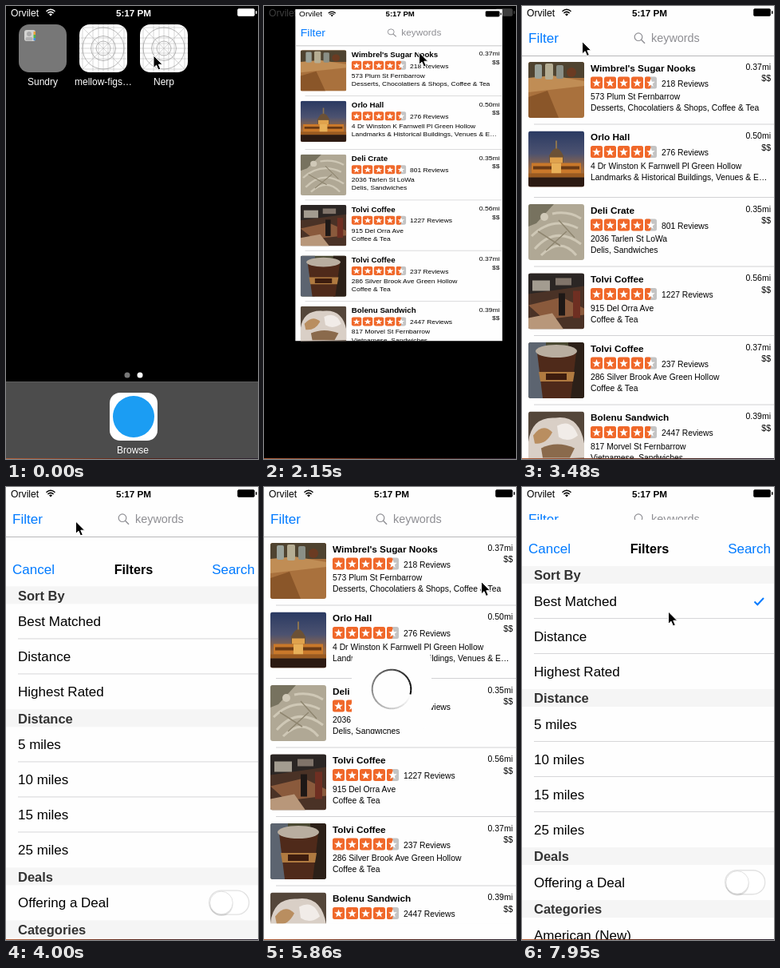
Animation of 316x567 px, one loop 8 s. Source, as an HTML page:

```html
<!DOCTYPE html>
<html lang="en">
<head>
<meta charset="utf-8">
<title>Phone demo</title>
<style>
  html, body { margin: 0; height: 100%; overflow: hidden; background: #000; }
  svg { display: block; width: 100vw; height: 100vh; font-family: "Liberation Sans", Arial, sans-serif; }
  .b { font-weight: bold; }
  .end { text-anchor: end; }
  .mid { text-anchor: middle; }
</style>
</head>
<body>
<svg id="stage" viewBox="0 0 316 567" xmlns="http://www.w3.org/2000/svg"></svg>
<script>
const W = 316, H = 567, BLUE = '#007aff';

// ---- drawing helpers (all return SVG markup) ----
const text = (x, y, size, str, fill = '#000', cls = '') =>
  `<text x="${x}" y="${y}" font-size="${size}" fill="${fill}" class="${cls}">${str.replace(/&/g, '&amp;')}</text>`;
const rect = (x, y, w, h, fill, r = 0) =>
  `<rect x="${x}" y="${y}" width="${w}" height="${h}" rx="${r}" fill="${fill}"/>`;
const circle = (x, y, r, fill, more = '') =>
  `<circle cx="${x}" cy="${y}" r="${r}" fill="${fill}" ${more}/>`;
const path = (d, fill, more = '') => `<path d="${d}" fill="${fill}" ${more}/>`;
const line = (d, color, width = 1) => path(d, 'none', `stroke="${color}" stroke-width="${width}"`);
const group = (x, y, body, id = '') => `<g id="${id}" transform="translate(${x} ${y})">${body}</g>`;
const map = (list, fn) => list.map(fn).join('');

function statusBar(color) {
  return text(6, 12.5, 12.2, 'Orvilet', color) +
    line('M50.5 6.8Q56 1.8 61.5 6.8M52.4 9Q56 5.8 59.6 9', color, 1.5) +
    path('M54 10.4Q56 8.6 58 10.4L56 12.6Z', color) +
    text(160, 12.5, 11.7, '5:17 PM', color, 'b mid') +
    `<rect x="290.5" y="3.5" width="21" height="9" rx="1.5" fill="${color}" stroke="${color}" stroke-opacity=".6"/>` +
    rect(313, 6, 1.5, 4, color, .7);
}

// ---- home screen ----
function blankIcon(x) {
  const grid = map([4, 17, 24, 30, 36, 43, 56], p => `M${p} 0V60M0 ${p}H60`);
  return group(x, 23, rect(0, 0, 60, 60, '#fff', 13) +
    `<g clip-path="url(#tile)">` + line(grid + 'M0 0L60 60M60 0L0 60', '#bdbdbd', .6) +
    map([9, 15.5, 26], r => circle(30, 30, r, 'none', 'stroke="#999" stroke-width=".7"')) + '</g>');
}

function homeScreen() {
  const label = (x, y, s) => text(x, y, 12, s, '#fff', 'mid');
  return rect(16, 23, 60, 60, '#777', 13) +
    rect(23, 30, 14, 14, '#d4d4d2', 3) + circle(29, 35, 3, '#aaa') + rect(24.5, 39, 9, 4.5, '#b2b2b2', 2) +
    rect(34.5, 32, 2.5, 4, '#e8a33c') + rect(34.5, 36, 2.5, 4, '#4fb848') + rect(34.5, 40, 2.5, 3, '#3c8fe0') +
    blankIcon(92) + blankIcon(168) +
    label(46, 99, 'Sundry') + label(122, 99, 'mellow-figs…') + label(198, 99, 'Nerp') +
    circle(152, 462, 3.5, '#777') + circle(168, 462, 3.5, '#fff') +
    rect(0, 470, W, 97, '#4c4c4c') + rect(0, 470, W, 1, '#5c5c5c') +
    rect(130, 484, 60, 60, '#fff', 13) + circle(160, 514, 26, '#1b9df3') + label(159, 560, 'Browse');
}

// ---- business list ----
const photos = [
  rect(0, 0, 70, 70, '#a9713d') + rect(0, 0, 70, 20, '#4f4330') + path('M0 20L30 17L70 24V30L0 38Z', '#c08d55') +
    rect(8, 3, 9, 18, '#9aa29a', 2) + rect(21, 2, 10, 20, '#b5ad93', 2) + rect(35, 4, 9, 17, '#8a8f86', 2) +
    path('M0 44L24 36L38 70H0Z', '#8a5629') + circle(54, 13, 6, '#6b3b22'),
  rect(0, 0, 70, 70, 'url(#dusk)') +
    path('M26 40V31Q35 12 44 31V40Z', '#6b5136') + rect(34, 12, 2, 10, '#8a7350') + rect(27, 33, 16, 7, '#e0a24c') +
    rect(4, 40, 62, 13, '#c9782a') + line('M6 46H64', '#6a3a14', 4) + rect(29, 40, 12, 13, '#e8b058') +
    rect(0, 53, 70, 5, '#9a5a20') + rect(0, 58, 70, 12, '#2c1a12'),
  rect(0, 0, 70, 70, '#b0a895') + path('M0 0H32L10 24L0 28Z', '#77725f') +
    line('M4 40Q30 14 62 30M8 56Q34 26 66 50M16 64Q40 40 60 64M30 12Q50 8 66 18', '#cfc8b6', 3) +
    line('M12 34L40 52M38 20L58 42M22 58L48 34', '#8f8670', 1.5) + circle(20, 16, 5, '#d0c9b8'),
  rect(0, 0, 70, 70, '#4a3226') + path('M0 0H70V16L0 26Z', '#2b2624') + rect(5, 9, 22, 13, '#a39c90') +
    rect(34, 6, 20, 9, '#80746a') + path('M0 40L42 30L70 44V52L20 58Z', '#8a5a3c') +
    rect(38, 25, 8, 28, '#1e1816') + rect(56, 22, 9, 34, '#6f2f22') + path('M0 56L30 50L44 70H0Z', '#b8977a'),
  rect(0, 0, 70, 70, '#4b4a33') + rect(0, 0, 22, 70, '#5c6470') + rect(50, 0, 20, 70, '#2c2018') +
    path('M11 13H60L53 70H18Z', '#4f2a1a') + `<ellipse cx="35" cy="11" rx="26" ry="8" fill="#b9aea0"/>` +
    path('M13 37H58L56 49H15Z', '#b07a40') + path('M22 39H48V47H22Z', '#3d1c0e'),
  rect(0, 0, 70, 70, '#54463a') + path('M0 38Q4 6 34 8Q64 4 70 40V58L0 60Z', '#d9cfc6') +
    path('M6 30Q18 14 30 26Q22 42 8 40Z', '#b98e60') + path('M36 18Q54 8 62 30Q50 40 38 32Z', '#f1ece8') +
    path('M16 46Q36 36 58 46L52 58H18Z', '#8a6a4c')
];

const rows = [
  [70, "Wimbrel's Sugar Nooks", 218, '0.37', '573 Plum St Fernbarrow', 'Desserts, Chocolatiers & Shops, Coffee & Tea'],
  [156.5, 'Orlo Hall', 276, '0.50', '4 Dr Winston K Farnwell Pl Green Hollow', 'Landmarks & Historical Buildings, Venues & E…'],
  [248, 'Deli Crate', 801, '0.35', '2036 Tarlen St LoWa', 'Delis, Sandwiches'],
  [334.5, 'Tolvi Coffee', 1227, '0.56', '915 Del Orra Ave', 'Coffee & Tea'],
  [421, 'Tolvi Coffee', 237, '0.37', '286 Silver Brook Ave Green Hollow', 'Coffee & Tea'],
  [507.5, 'Bolenu Sandwich', 2447, '0.39', '817 Morvel St Fernbarrow', 'Vietnamese, Sandwiches']
];

const starPath = 'M' + Array.from({ length: 10 }, (_, i) => {
  const r = i % 2 ? 2.3 : 5.6, a = i * Math.PI / 5;
  return (7.5 + r * Math.sin(a)).toFixed(2) + ' ' + (8 - r * Math.cos(a)).toFixed(2);
}).join('L') + 'Z';

const stars = map([0, 1, 2, 3, 4], i => group(86 + 17 * i, 18.5,
  rect(0, 0, 15, 15, i < 4 ? '#f0682a' : '#c4c4c4', 2.5) +
  (i < 4 ? '' : rect(0, 0, 7.5, 15, '#f0682a', 2)) + path(starPath, '#fff')));

function businessRow([y, name, reviews, miles, address, kinds], i) {
  return group(0, y,
    (i ? line('M15 -8.5H316', '#d2d2d4') : '') +
    `<g transform="translate(8 0)" clip-path="url(#thumb)">${photos[i]}</g>` + stars +
    text(86, 11.5, 11.8, name, '#000', 'b') + text(175, 30.5, 10.3, reviews + ' Reviews') +
    text(86, 47, 10.35, address) + text(86, 61, 10.35, kinds) +
    text(312, 9.5, 10.5, miles + 'mi', '#000', 'end') + text(312, 24, 10.5, '$$', '#000', 'end'));
}

const listScreen = () => rect(0, 0, W, H, '#fefefe') + map(rows, businessRow) +
  line('M0 62.5H316', '#b8b8ba') +
  `<g id="filter">${text(8, 46.3, 17.1, 'Filter', BLUE)}</g>` +
  circle(146, 38.7, 4.8, 'none', 'stroke="#8e8e93" stroke-width="1.2"') +
  line('M149.5 42.3L154 46.8', '#8e8e93', 1.4) + text(162, 45, 14.4, 'keywords', '#8e8e93');

// ---- filter sheet ----
function filterSheet() {
  const header = (y, s) => rect(0, y, W, 22, '#f5f5f5') + text(15, y + 17.5, 16.5, s, '#333', 'b');
  const items = (y, list) => map(list, (s, i) =>
    text(15, y + 44 * i + 28, 17, s) + (i ? line(`M15 ${y + 44 * i - .5}H316`, '#d6d6d8') : ''));
  return rect(0, 0, W, H, '#fefefe') +
    text(8, 42.2, 17, 'Cancel', BLUE) + text(160, 42.2, 16.2, 'Filters', '#000', 'b mid') +
    text(312, 42.2, 17, 'Search', BLUE, 'end') +
    `<g id="press">${rect(0, 80, W, 44, '#d9d9d9')}</g>` +
    header(58, 'Sort By') + items(80, ['Best Matched', 'Distance', 'Highest Rated']) +
    header(212, 'Distance') + items(234, ['5 miles', '10 miles', '15 miles', '25 miles']) +
    header(410, 'Deals') + items(432, ['Offering a Deal']) +
    `<rect x="254.7" y="438.7" width="50" height="30" rx="15" fill="#fff" stroke="#e2e2e2" stroke-width="1.4"/>` +
    circle(270, 456, 14.5, '#000', 'opacity=".12"') +
    circle(270, 454, 14.3, '#fff', 'stroke="#d5d5d5" stroke-width=".7"') +
    header(476, 'Categories') + items(498, ['American (New)', 'American (Traditional)']) +
    `<g id="check">${line('M291.5 102.5L295.3 106.3L303 98', BLUE, 2)}</g>`;
}

const spinner = Array.from({ length: 60 }, (_, i) => circle(0, 0, 24.3, 'none',
  `pathLength="60" stroke="#000" stroke-width="2" stroke-opacity="${(i / 59).toFixed(2)}"
   stroke-dasharray="1.05 58.95" stroke-dashoffset="${-i}"`)).join('');

const $ = id => document.getElementById(id);
$('stage').innerHTML =
  `<defs>
    <clipPath id="tile"><rect width="60" height="60" rx="13"/></clipPath>
    <clipPath id="thumb"><rect width="70" height="70" rx="3"/></clipPath>
    <clipPath id="screen"><rect width="${W}" height="${H}"/></clipPath>
    <linearGradient id="edge"><stop stop-color="#b0603c"/><stop offset=".5" stop-color="#5a2418"/><stop offset="1" stop-color="#2a2230"/></linearGradient>
    <linearGradient id="dusk" x2="0" y2="1"><stop stop-color="#2a3a62"/><stop offset=".4" stop-color="#4c5270"/><stop offset=".7" stop-color="#a06a3c"/></linearGradient>
  </defs>` + rect(0, 0, W, H, '#000') +
  `<g id="home">${homeScreen()}</g><g id="homeBar">${statusBar('#fff')}</g>
  <g id="app" clip-path="url(#screen)">${listScreen()}<g id="sheet">${filterSheet()}</g>${statusBar('#000')}</g>
  <g id="hud">${rect(110, 204, 100, 99, '#fefefe', 14)}${group(160, 253, `<g id="spin">${spinner}</g>`)}</g>` +
  rect(0, 566, W, 1, 'url(#edge)') +
  group(0, 0, path('M0 0V15.5L3.5 12.2L6 18L8.8 16.8L6.3 11.2H11.2Z', '#000', 'stroke="#fff" stroke-width="1"'), 'cursor');

// ---- motion ----
const clamp = v => Math.max(0, Math.min(1, v));
const ramp = (t, a, b) => clamp((t - a) / (b - a));
const show = (id, opacity) => $(id).setAttribute('opacity', opacity);
const place = (id, transform) => $(id).setAttribute('transform', transform);

// critically damped spring falling from 1 to 0
function spring(t, start) {
  const x = Math.max(0, t - start) * .0195;
  return (1 + x) * Math.exp(-x);
}

// pointer stops: time, x, y
const stops = [
  [1170, 185, 62], [1530, 194.5, 58], [3120, 194.5, 58], [3640, 36, 40], [3740, 36, 40], [3997, 87.5, 43],
  [4520, 122, 108], [4790, 122, 108], [5400, 276, 36], [5580, 276, 36], [5841, 272.5, 118.5],
  [6360, 195, 243], [6910, 195, 243], [7590, 36, 40], [7690, 36, 40], [7948, 183.5, 156]
];

function pointer(t) {
  const i = stops.findIndex(s => s[0] > t);
  if (i === 0) return stops[0].slice(1);
  if (i < 0) return stops[stops.length - 1].slice(1);
  const [a, b] = [stops[i - 1], stops[i]];
  const u = ramp(t, a[0], b[0]), e = u * u * (3 - 2 * u);
  return [1, 2].map(k => a[k] + (b[k] - a[k]) * e);
}

function draw(t) {
  // the app grows out of its icon, each edge at its own pace
  const u = ramp(t, 1802, 2422);
  const edge = (from, to, power) => to + (from - to) * (1 - u) ** power;
  const left = edge(168, 0, 1.74), right = edge(228, W, 1.96);
  const top = edge(23, 0, 2.08), bottom = edge(83, H, 1.42);
  const w = right - left, h = bottom - top;
  place('app', `translate(${left} ${top}) scale(${w / W} ${h / H})`);
  place('home', `translate(${left} ${top}) scale(${w / 60} ${h / 60}) translate(-168 -23)`);
  show('app', clamp(u / .4));
  show('home', 1 - clamp(u / .5));
  show('homeBar', 1 - clamp(u / .75));

  const away = spring(t, 3808) - spring(t, 5578) + spring(t, 7728);
  place('sheet', `translate(0 ${H * away})`);
  show('filter', (t > 3640 && t < 3800) || (t > 7590 && t < 7720) ? .3 : 1);
  show('press', t > 4600 && t < 4780 ? 1 : 0);
  show('check', t > 4780 ? 1 : 0);

  show('hud', ramp(t, 5578, 5750) * (1 - ramp(t, 6200, 6360)));
  place('spin', `rotate(${15 + (t - 5841) * .36})`);
  place('cursor', `translate(${pointer(t)})`);
}

const STEP = 87.8, PHASE = 1890;
function tick() {
  const t = performance.now() % 8000;
  draw(PHASE + Math.floor((t - PHASE + 8) / STEP) * STEP);
  requestAnimationFrame(tick);
}
tick();
</script>
</body>
</html>
```
